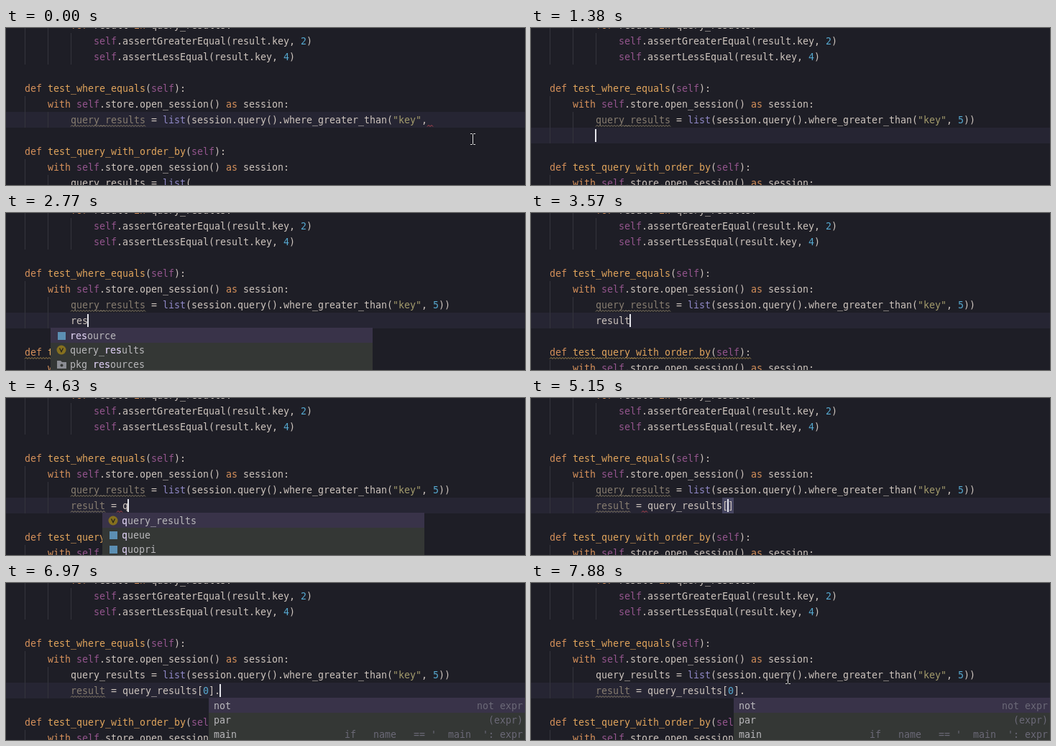
These frames come from a looping animation (722 by 219 pixels, 8000 ms). An HTML page:

```html
<!DOCTYPE html>
<html lang="en">
<head>
<meta charset="utf-8">
<title>Typing in a code editor</title>
<style>
  html, body { margin: 0; width: 100%; height: 100%; overflow: hidden; background: #1e1e26; }
  svg { display: block; }
  text { font: 13.29px "DejaVu Sans Mono", "Noto Sans Mono", monospace; white-space: pre; }
</style>
</head>
<body>
<svg id="stage" width="722" height="219" viewBox="0 0 722 219"></svg>
<script>
const LOOP = 8000, CHAR = 8, ROW = 22, LEFT = 90, EDIT_ROW = 117;
const color = {
  text: '#cdc4bd', keyword: '#d5905a', name: '#e0a45c', self: '#94558d', builtin: '#8f88c6',
  number: '#56a8cf', string: '#a39b6c', unused: '#877d70', weak: '#8a7f68', warn: '#a88a4c',
  error: '#bd4650', line: '#262533', guide: '#34343c', bracket: '#474661', usage: '#36344a',
  popup: '#343735', selected: '#393349', item: '#b9b8bb', match: '#cbbce2', hint: '#6b6977'
};
const stage = document.getElementById('stage');

const rect = (x, y, w, h, fill) => `<rect x="${x}" y="${y}" width="${w}" height="${h}" fill="${fill}"/>`;
const label = (x, y, fill, s, extra = '') => `<text x="${x}" y="${y}" fill="${fill}" ${extra}>${s}</text>`;
const colX = col => LEFT + col * CHAR;

// Last entry of [[time, value], ...] that has started.
const at = (steps, t) => steps.reduce((value, [start, next]) => t >= start ? next : value, null);

const TOKEN = /"\w*"|\b(?:def|with|as|for|in)\b|\w+|\s+|[^\w\s"]+|"/g;

function tokenColor(token, previous) {
  if (/^(def|with|as|for|in)$/.test(token)) return color.keyword;
  if (previous === 'def') return color.name;
  if (token === 'self') return color.self;
  if (token === 'list') return color.builtin;
  if (/^\d/.test(token)) return color.number;
  return token[0] === '"' ? color.string : color.text;
}

function code(x, top, source, unused = '') {
  let out = '', previous = '';
  for (const { 0: token, index } of source.matchAll(TOKEN)) {
    if (!token.trim()) continue;
    const fill = token === unused && index === 0 ? color.unused : tokenColor(token, previous);
    out += label(x + index * CHAR, top + 16, fill, token);
    previous = token;
  }
  return out;
}

function squiggle(x, top, chars, stroke) {
  let d = `M${x} ${top + 20.5}`;
  for (let i = 0; i < chars * CHAR / 4; i++) d += 'l2 -2l2 2';
  return `<path d="${d}" fill="none" stroke="${stroke}" stroke-width="1"/>`;
}

const guide = (x, y, h) => rect(x, y, 1, h, color.guide);

const QUERY = 'query_results = list(session.query().where_greater_than("key", ';
const firstLine = [[0, QUERY], [140, QUERY + '5'], [640, QUERY + '5)'], [1020, QUERY + '5))']];
const secondLine = [
  [0, ''], [2330, 'r'], [2460, 're'], [2650, 'res'], [2820, 'resu'], [3070, 'resul'], [3270, 'result'],
  [3700, 'result '], [3830, 'result ='], [3950, 'result = '], [4580, 'result = q'],
  [4830, 'result = query_results'], [5150, 'result = query_results[]'],
  [5650, 'result = query_results[0]'], [6660, 'result = query_results[0].']
];
const errorCol = [[0, 62], [770, 65], [1020, 66], [1380, null], [4380, 8], [5470, 23], [5650, null]];
const brackets = [[0, []], [640, [55, 64]], [1020, [20, 65]], [1380, []],
  [5150, [22, 23]], [5650, [22, 24]], [6660, []]];

const moduleItem = name => ({ icon: 'module', name });
const resultsItem = { icon: 'variable', name: 'query_results' };
const resourceList = [moduleItem('resource'), resultsItem, { icon: 'folder', name: 'pkg_resources' }];
const popups = [
  [0, null],
  [2550, { x: 62, items: resourceList, typed: 're' }],
  [2650, { x: 62, items: resourceList, typed: 'res' }],
  [2820, { x: 62, items: [resultsItem], typed: 'resu' }],
  [3070, { x: 62, items: [resultsItem], typed: 'resul' }],
  [3270, { x: 62, items: [resultsItem], typed: 'result' }],
  [3570, null],
  [4630, { x: 134, items: [resultsItem, moduleItem('queue'), moduleItem('quopri')], typed: 'q' }],
  [4830, null],
  [6850, { x: 282, typed: '', items: [
    { name: 'not', note: 'not expr' },
    { name: 'par', note: '(expr)' },
    { name: 'main', note: "if __name__ == '__main__': expr" }] }]
];

function icon(kind, x, y) {
  if (kind === 'module') return rect(x - 5, y - 5, 11, 11, '#5c8fb3');
  if (kind === 'variable')
    return `<circle cx="${x}" cy="${y}" r="6.5" fill="#85701f"/>` +
      `<path d="M${x - 2.5} ${y - 2.5}l2.5 5l2.5 -5" fill="none" stroke="#22211c" stroke-width="1.3"/>`;
  return `<path d="M${x - 6} ${y - 5}h5l2 2h6v9h-13z" fill="#8b8d93"/>` +
    `<circle cx="${x + 0.5}" cy="${y + 1.5}" r="2" fill="#343735"/>`;
}

function drawPopup({ x, items, typed }) {
  const top = 160, width = 448, single = items.length === 1;
  let out = rect(x, top, width, single ? 43 : 80, color.popup) + rect(x, top, width, 21, color.selected);
  items.forEach(({ icon: kind, name, note }, i) => {
    const base = top + 16 + i * 20, textX = x + (kind ? 27 : 7), start = name.indexOf(typed);
    if (kind) out += icon(kind, x + 15, base - 5);
    out += label(textX, base, color.item, name);
    if (typed && start >= 0) out += label(textX + start * CHAR, base, color.match, typed);
    if (note) out += label(719, base, color.hint, note, 'text-anchor="end"');
  });
  if (single)
    out += label(x + 8, 196, '#85858a', 'Press Enter to insert, Tab to replace',
      'style="font:11.5px Inter,sans-serif"');
  return out;
}

function drawPointer(t) {
  let x = 649, y = 155;
  if (t >= 140) {
    if (t < 7080) return '';
    const step = 380 / 6, tick = Math.floor((t - 7499.9) / step);
    const now = 7500 + tick * step;
    if (now < 7436) {
      const p = Math.max(0, (now - 7080) / 356);
      x -= 123 * p;
      y -= 2 * p;
    } else {
      const p = Math.min(1, (now - 7436) / 444);
      x = 526 - 169 * p;
      y = 153 - 20 * p;
    }
  }
  const d = `M${Math.round(x) - 3} ${Math.round(y) - 7.5}h2.5l1 1l1 -1h2.5m-3.5 1v13m-3.5 1h2.5l1 -1l1 1h2.5`;
  return `<path d="${d}" fill="none" stroke="#15151b" stroke-width="2.4"/>` +
    `<path d="${d}" fill="none" stroke="#e6e6e6" stroke-width="1"/>`;
}

function drawScene(t) {
  const entered = t >= 1380;
  const line1 = at(firstLine, t), line2 = at(secondLine, t);
  const caretTop = EDIT_ROW + (entered ? ROW : 0);
  const nextDef = EDIT_ROW + ROW * (entered ? 3 : 2) + (entered ? 0 : 11 - 11);
  const unusedQuery = t < 5720, unusedResult = t >= 4320;
  let out = rect(0, 0, 722, 219, '#1e1e26') + rect(0, caretTop, 722, ROW, color.line);

  out += guide(26, 0, 51) + guide(58, 0, 51) + guide(90, 7, 44);
  out += guide(26, 95, caretTop + ROW - 95) + guide(58, EDIT_ROW, caretTop + ROW - EDIT_ROW);
  out += guide(26, nextDef + ROW, 60) + guide(58, nextDef + 2 * ROW, 40);

  if (t >= 4830 && t < 5150)
    out += rect(colX(0), EDIT_ROW, 104, ROW, color.usage) + rect(colX(9), EDIT_ROW + ROW, 104, ROW, color.usage);
  for (const col of at(brackets, t)) out += rect(colX(col), caretTop, CHAR, ROW, color.bracket);

  out += code(90, -15, 'for result in query_results:');
  out += code(122, 7, 'self.assertGreaterEqual(result.key, 2)');
  out += code(122, 29, 'self.assertLessEqual(result.key, 4)');
  out += code(26, 73, 'def test_where_equals(self):');
  out += code(58, 95, 'with self.store.open_session() as session:');
  out += code(LEFT, EDIT_ROW, line1, unusedQuery ? 'query_results' : '');
  out += code(LEFT, EDIT_ROW + ROW, line2, unusedResult ? 'result' : '');
  out += code(26, nextDef, 'def test_query_with_order_by(self):');
  out += code(58, nextDef + ROW, 'with self.store.open_session() as session:');
  out += code(90, nextDef + 2 * ROW, 'query_results = list(');

  if (unusedQuery) out += squiggle(LEFT, EDIT_ROW, 13, color.weak);
  if (unusedResult) out += squiggle(LEFT, EDIT_ROW + ROW, 6, color.weak);
  if (t >= 2080 && t < 4580) out += squiggle(26, nextDef, 35, color.warn);
  const error = at(errorCol, t);
  if (error !== null) out += squiggle(colX(error), caretTop, 1, color.error);

  const popup = at(popups, t);
  if (popup) out += drawPopup(popup);

  if (t >= 70 && t < 7690) {
    let col = (entered ? line2 : line1).length;
    if (t >= 5150 && t < 6100) col--;
    out += rect(colX(col) - 1, caretTop + 2, 2, 18, '#e4e4ea');
  }
  return out + drawPointer(t);
}

let shown = '';
function render(now) {
  const scene = drawScene(now % LOOP);
  if (scene !== shown) stage.innerHTML = shown = scene;
}

const begin = performance.now();
function tick() {
  render(performance.now() - begin);
  requestAnimationFrame(tick);
}
tick();
</script>
</body>
</html>
```
